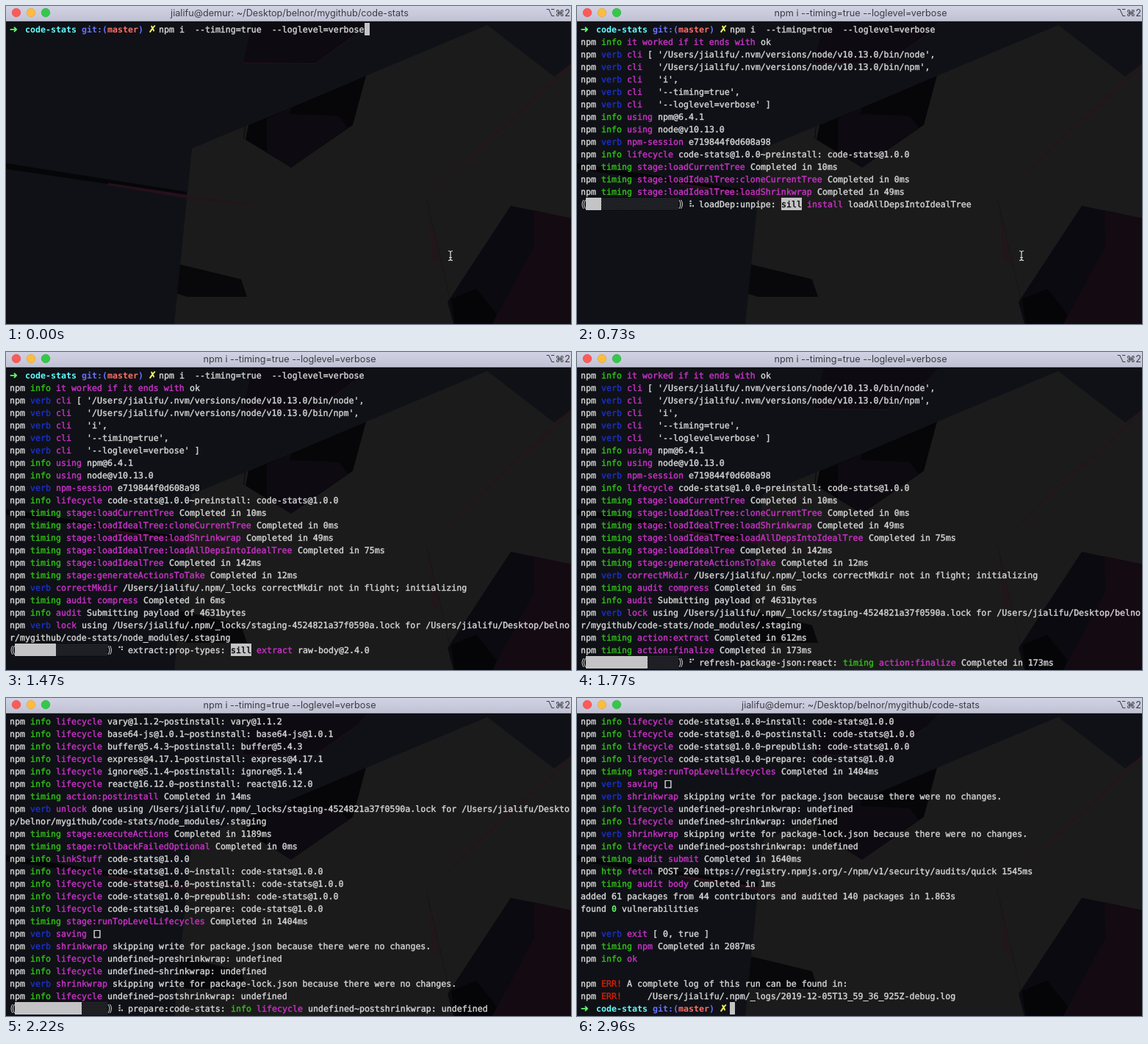
An HTML page that plays this animation: 769x433 px, repeating every 3260 ms.

```html
<!DOCTYPE html>
<html lang="en">
<head>
<meta charset="utf-8">
<title>Terminal</title>
<style>
html, body { margin: 0; width: 100%; height: 100%; overflow: hidden; background: #0f1116; }
svg { display: block; width: 769px; height: 433px; }
text { white-space: pre; }
#screen text {
  font: 11.627px "DejaVu Sans Mono", "DejaVu Sans", monospace;
  text-rendering: geometricPrecision;
  fill: currentColor;
  stroke: currentColor;
  stroke-width: .38;
}
#screen text.bold { font-weight: bold; stroke: none; }
#screen text.symbol { font: bold 13px "DejaVu Sans", sans-serif; }
.bar { font: 12.7px Inter, "DejaVu Sans", sans-serif; fill: #3d3d42; }
</style>
</head>
<body>
<svg viewBox="0 0 769 433" xml:space="preserve">
  <defs>
    <linearGradient id="chrome" x2="0" y2="1">
      <stop offset="0" stop-color="#d1d3e4"/><stop offset="1" stop-color="#c0c2d4"/>
    </linearGradient>
    <pattern id="shade" width="2" height="4" patternUnits="userSpaceOnUse">
      <path d="M0 0h1v1h-1zM1 2h1v1h-1z" fill="#4c4c4f"/>
    </pattern>
  </defs>
  <g id="wallpaper">
    <path fill="#0f1116" d="M0 0h769v433H0z"/>
    <path fill="#1b1b1b" d="M655 26L746 96L769 79V433H229L253 194L490 95z"/>
    <path fill="#0d0a11" d="M336 21H492L474 40L421 79L323 77z"/>
    <path fill="none" stroke="#2a101c" d="M323 77.5L421 78.5L474 40"/>
    <path fill="#060608" d="M490 95L472 162L388 220L326 182L330 162L388 138z"/>
    <path fill="#0d0a11" d="M355 153L388 138L386 147L453 150L465 166L388 220L355 199z"/>
    <path fill="none" stroke="#08080a" d="M325.500 163L323.500 181"/>
    <path fill="#060608" d="M0 214L246 253V258L0 222z"/>
    <path fill="#26101b" d="M139 241L246 257V262L139 244z"/>
    <path fill="#21161a" d="M246 257L335 270V273L246 262z"/>
    <path fill="#08080a" d="M237 352L320 372L328 396H247L233 392z"/>
    <path fill="#21171a" d="M769 78V84L574 262L650 187zM575 270L581 300L592 350L580 347z"/>
    <path fill="none" stroke="#161617" d="M572 262L609 420"/>
    <path fill="#0b0a10" d="M687 272L769 289V433H609L601 403z"/>
    <path fill="#140a12" d="M718 278L769 289V433H662L719 327z"/>
    <path fill="#050507" d="M606 399L640 385L668 420L662 433H611z"/>
  </g>
  <g id="screen"></g>
  <g id="pointer" fill="none" stroke="#dcdcdc" stroke-width="1.2">
    <path d="M602 333.500q3 0 3 2v9q0 2-3 2M608 333.500q-3 0-3 2M608 346.500q-3 0-3-2M603 342.500h4"/>
  </g>
  <path fill="url(#chrome)" d="M0 0h769v21H0z"/>
  <path fill="#a3a5b3" d="M0 20h769v1H0z"/>
  <g stroke-width=".6">
    <circle cx="14" cy="9" r="5.800" fill="#fc5b57" stroke="#df4744"/>
    <circle cx="34" cy="9" r="5.800" fill="#fdbc40" stroke="#de9f34"/>
    <circle cx="54" cy="9" r="5.800" fill="#34c84a" stroke="#27aa35"/>
  </g>
  <text id="title" class="bar" x="386" y="14" text-anchor="middle"></text>
  <text class="bar" x="768" y="14" text-anchor="end">⌥⌘2</text>
</svg>
<script>
const LOOP = 3260, COLS = 109, ROWS = 24, CELL = 7, LEAD = 17, LEFT = 5, TOP = 23;
const WHITE = '#d6d6d6', BLOCK = '#c4c4c6', GREEN = '#2fc414', BLUE = '#1c30c8',
      PINK = '#cb32c8', RED = '#d02008';
const LEVEL = { info: GREEN, timing: GREEN, http: GREEN, verb: BLUE, 'ERR!': RED, sill: 'inverse' };

const HOME = '/Users/jialifu';
const PROJECT = HOME + '/Desktop/belnor/mygithub/code-stats';
const LOCK = HOME + '/.npm/_locks/staging-4524821a37f0590a.lock';
const HOST_TITLE = 'jialifu@demur: ~/Desktop/belnor/mygithub/code-stats';
const NPM_TITLE = 'npm i --timing=true --loglevel=verbose';

// A row is a list of segments: [colour, text, class]
const prompt = [
  ['#5ffa68', '➜  ', 'symbol'], ['#60fdff', 'code-stats ', 'bold'], ['#6871ff', 'git:(', 'bold'],
  ['#ff6e67', 'master', 'bold'], ['#6871ff', ') ', 'bold'], ['#fffc67', '✗ ', 'symbol']
];
const command = [...prompt, [WHITE, 'npm i  --timing=true  --loglevel=verbose']];

function message(level, head, rest) {
  const segs = [[LEVEL[level], level], [WHITE, ' ']];
  if (head) segs.push([PINK, head], [WHITE, ' ']);
  return [...segs, [WHITE, rest]];
}

function wrap(segs) {
  const rows = [[]];
  let col = 0;
  for (let [color, text, style] of segs) {
    while (col + text.length > COLS) {
      rows[rows.length - 1].push([color, text.slice(0, COLS - col), style]);
      text = text.slice(COLS - col);
      rows.push([]);
      col = 0;
    }
    rows[rows.length - 1].push([color, text, style]);
    col += text.length;
  }
  return rows;
}

function parse(line) {
  const parts = line.split('|');
  return wrap(parts.length < 3 ? [[WHITE, line]] : [[WHITE, 'npm '], ...message(...parts)]);
}

const log = text => text.split('\n').flatMap(parse);
const post = name => `info|lifecycle|${name}~postinstall: ${name}`;
const stage = step => `info|lifecycle|code-stats@1.0.0~${step}: code-stats@1.0.0`;

const startLog = log(`info|it worked if it ends with|ok
verb|cli|[ '${HOME}/.nvm/versions/node/v10.13.0/bin/node',
verb|cli|  '${HOME}/.nvm/versions/node/v10.13.0/bin/npm',
verb|cli|  'i',
verb|cli|  '--timing=true',
verb|cli|  '--loglevel=verbose' ]
info|using|npm@6.4.1
info|using|node@v10.13.0
verb|npm-session|e719844f0d608a98
${stage('preinstall')}
timing|stage:loadCurrentTree|Completed in 10ms
timing|stage:loadIdealTree:cloneCurrentTree|Completed in 0ms
timing|stage:loadIdealTree:loadShrinkwrap|Completed in 49ms
timing|stage:loadIdealTree:loadAllDepsIntoIdealTree|Completed in 75ms
timing|stage:loadIdealTree|Completed in 142ms
timing|stage:generateActionsToTake|Completed in 12ms
verb|correctMkdir|${HOME}/.npm/_locks correctMkdir not in flight; initializing
timing|audit compress|Completed in 6ms
info|audit|Submitting payload of 4631bytes
verb|lock|using ${LOCK} for ${PROJECT}/node_modules/.staging
timing|action:extract|Completed in 612ms
timing|action:finalize|Completed in 173ms`);

const linkLog = log((
  'range-parser@1.2.1 react-is@16.12.0 prop-types@15.7.2 safe-buffer@5.1.2 ' +
  'content-disposition@0.5.3 safer-buffer@2.1.2 iconv-lite@0.4.24 ms@2.1.1 ' +
  'setprototypeof@1.1.1 statuses@1.5.0 toidentifier@1.0.0 http-errors@1.7.2 send@0.17.1 ' +
  'serve-static@1.14.1 type-is@1.6.18 unpipe@1.0.0 finalhandler@1.1.2 raw-body@2.4.0 ' +
  'body-parser@1.19.0 utils-merge@1.0.1 vary@1.1.2 base64-js@1.0.1 buffer@5.4.3'
).split(' ').map(name => 'info|linkStuff|' + name).join('\n'));

const finishLog = log(`${post('vary@1.1.2')}
${post('base64-js@1.0.1')}
${post('buffer@5.4.3')}
${post('express@4.17.1')}
${post('ignore@5.1.4')}
${post('react@16.12.0')}
timing|action:postinstall|Completed in 14ms
verb|unlock|done using ${LOCK} for ${PROJECT}/node_modules/.staging
timing|stage:executeActions|Completed in 1189ms
timing|stage:rollbackFailedOptional|Completed in 0ms
info|linkStuff|code-stats@1.0.0
${stage('install')}
${stage('postinstall')}
${stage('prepublish')}
${stage('prepare')}
timing|stage:runTopLevelLifecycles|Completed in 1404ms
verb|saving|[]
verb|shrinkwrap|skipping write for package.json because there were no changes.
info|lifecycle|undefined~preshrinkwrap: undefined
info|lifecycle|undefined~shrinkwrap: undefined
verb|shrinkwrap|skipping write for package-lock.json because there were no changes.
info|lifecycle|undefined~postshrinkwrap: undefined`);

const summary = [
  ...log(`timing|audit submit|Completed in 1640ms
http|fetch|POST 200 https://registry.npmjs.org/-/npm/v1/security/audits/quick 1545ms
timing|audit body|Completed in 1ms
added 61 packages from 44 contributors and audited 140 packages in 1.863s`),
  [[WHITE, 'found '], ['#5ffa68', '0', 'bold'], [WHITE, ' vulnerabilities']],
  ...log(`
verb|exit|[ 0, true ]
timing|npm|Completed in 2087ms
info|ok|

ERR!||A complete log of this run can be found in:
ERR!||    ${HOME}/.npm/_logs/2019-12-05T13_59_36_925Z-debug.log`)
];

const output = [command, ...startLog, ...linkLog, ...finishLog, ...summary];

const gauge = (fill, spin, task, ...msg) =>
  ({ fill, spin, segs: [[WHITE, task + ': '], ...message(...msg)] });

// at: start in ms, n: finished rows, then whatever stands on the row below
const states = [
  { at: 0, n: 0, tail: command, cursor: 69 },
  { at: 300, n: 1, cursor: 0 },
  { at: 440, n: 9, cursor: 0 },
  { at: 590, n: 10 },
  { at: 730, n: 14, gauge: gauge(3, '⠧', 'loadDep:unpipe', 'sill', 'install', 'loadAllDepsIntoIdealTree') },
  { at: 880, n: 20, cursor: 0 },
  { at: 1030, n: 22, gauge: gauge(7, '⠴', 'extract:iconv-lite', 'sill', 'tarball',
    'trying iconv-lite@0.4.24 by hash: sha512-v3MXnZAcvnywkTUE') },
  { at: 1470, n: 22, gauge: gauge(8, '⠙', 'extract:prop-types', 'sill', 'extract', 'raw-body@2.4.0') },
  { at: 1620, n: 23, gauge: gauge(11, '⠹', 'finalize:body-parser', 'sill', 'finalize',
    PROJECT + '/node_modules/body-parser') },
  { at: 1770, n: 24, gauge: gauge(12, '⠋', 'refresh-package-json:react', 'timing', 'action:finalize',
    'Completed in 173ms') },
  { at: 1920, n: 47, tail: [[WHITE, 'npm '], [GREEN, 'info']], cursor: 8 },
  { at: 2070, n: 70, cursor: 0 },
  { at: 2220, n: 70, gauge: gauge(13, '⠧', 'prepare:code-stats', 'info', 'lifecycle',
    'undefined~postshrinkwrap: undefined') },
  { at: 2510, n: output.length, tail: prompt, cursor: 29 }
];

const $ = id => document.getElementById(id);
const screen = $('screen');
const colX = col => LEFT + col * CELL;
const rowY = row => TOP + row * LEAD;

function add(tag, attrs, text) {
  const node = document.createElementNS('http://www.w3.org/2000/svg', tag);
  for (const key in attrs) node.setAttribute(key, attrs[key]);
  if (text) node.textContent = text;
  screen.appendChild(node);
}

function block(row, col, width, fill) {
  add('rect', { x: colX(col), y: rowY(row), width: width * CELL, height: LEAD, fill });
}

// An empty pair of brackets reads as one closed box
function joinBrackets(row, col, color) {
  add('path', {
    d: `M${colX(col) + 4} ${rowY(row) + 4.5}h6m0 9.600h-6`, fill: 'none', stroke: color
  });
}

function drawRow(row, segs, col = 0, limit = COLS) {
  for (const [color, text, style = ''] of segs) {
    const shown = text.slice(0, limit - col);
    const inverse = color === 'inverse';
    if (inverse) block(row, col, shown.length, BLOCK);
    if (shown.trim()) {
      add('text', {
        x: colX(col), y: rowY(row) + 13, color: inverse ? '#000' : color, class: style
      }, shown);
    }
    if (shown === '[]') joinBrackets(row, col, color);
    col += text.length;
  }
}

function drawGauge(row, { fill, spin, segs }) {
  const y = rowY(row) + 3;
  const arcs = [[9, -4], [11.5, -4], [139, 4], [141.5, 4]];
  add('path', {
    d: arcs.map(([x, bend]) => `M${x} ${y}q${bend} 6 0 12`).join(''),
    fill: 'none', stroke: WHITE
  });
  block(row, 1, fill, BLOCK);
  block(row, 1 + fill, 18 - fill, 'url(#shade)');
  drawRow(row, [[WHITE, spin]], 21);
  drawRow(row, segs, 23, COLS - 1);
}

function drawScreen(state) {
  screen.replaceChildren();
  const top = Math.max(0, state.n + 1 - ROWS);
  const last = state.n - top;
  output.slice(top, state.n).forEach((segs, row) => drawRow(row, segs));
  if (state.tail) drawRow(last, state.tail);
  if (state.gauge) drawGauge(last, state.gauge);
  if (state.cursor !== undefined) block(last, state.cursor, 1, BLOCK);
}

let current;
function render(t) {
  const state = states.findLast(s => s.at <= t);
  if (state !== current) drawScreen(current = state);
  const title = t >= 440 && t < 2960 ? NPM_TITLE : HOST_TITLE;
  if ($('title').textContent !== title) $('title').textContent = title;
  $('pointer').setAttribute('visibility', t < 1320 ? 'visible' : 'hidden');
}

const start = performance.now();
function tick() {
  render((performance.now() - start) % LOOP);
  requestAnimationFrame(tick);
}
tick();
</script>
</body>
</html>
```
